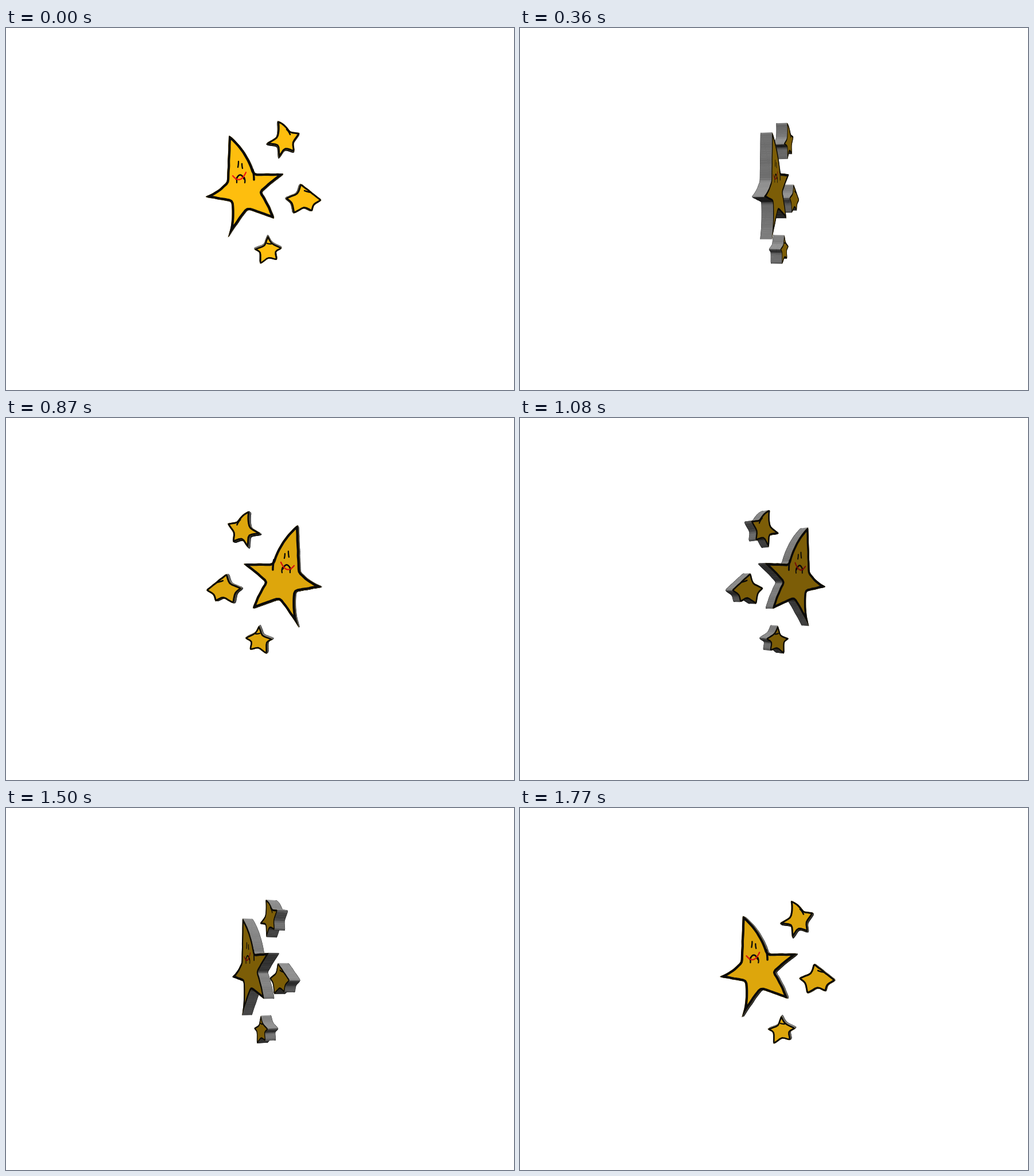
Write an HTML page with a canvas that moves like this. It is 885 by 632 pixels and loops after 1.8 s.

```html
<!DOCTYPE html>
<html lang="en">
<head>
<meta charset="utf-8">
<title>Turning stars</title>
<style>
  html, body { margin: 0; width: 100%; height: 100%; overflow: hidden; background: #fff; }
  canvas { display: block; }
</style>
</head>
<body>
<canvas id="stage" width="885" height="632"></canvas>
<script>
const ctx = document.getElementById('stage').getContext('2d');
const LOOP = 1800, STEP = 30;
const AXIS = 449, EYE_Y = 296, DIST = 1100, HALF = 10;
const INK = '#0a0a0a';

// Each star: tip, notch, tip, notch... clockwise from the top.
// A third value bows the following edge outward; tick is the pen's overshoot.
const stars = [
  {
    pen: 4.2,
    corners: [[388, 186, 6], [433, 254], [485, 254, -1], [445, 287, 2], [468, 334, -1],
      [421, 317, -1], [386, 367, -4], [392, 303], [346, 295, -3], [385, 268]],
    tick: [[430, 248], [432, 256], [432, 265]]
  },
  {
    pen: 3,
    corners: [[472, 161, 3], [495, 181], [513, 183], [501, 200], [503, 217],
      [487, 211], [475, 228], [473, 205], [452, 202], [471, 191, -2]],
    tick: [[489, 177], [493, 181], [495, 186]]
  },
  {
    pen: 3,
    corners: [[513, 271], [531, 285], [551, 301], [537, 309], [534, 321],
      [519, 314], [501, 325], [497, 306], [486, 297], [507, 288]],
    tick: [[520, 284], [525, 286], [531, 287]]
  },
  {
    pen: 2.7,
    corners: [[456, 361], [463, 375], [482, 384], [470, 391], [473, 406],
      [458, 402], [442, 413], [442, 392], [431, 386], [450, 379]],
    tick: [[455, 376], [458, 377], [462, 377]]
  }
];

const features = [
  { pen: 2.3, curve: [[405, 233], [405, 238], [404, 243]] },
  { pen: 2.3, curve: [[411, 237], [411, 241], [412, 245]] },
  { pen: 2.6, curve: [[401, 264], [408, 249], [415, 264]] },
  { pen: 2.3, curve: [[402, 262], [402, 266], [402, 270]] },
  { pen: 2.3, curve: [[415, 261], [417, 265], [416, 270]] },
  { pen: 2.3, red: true, curve: [[395, 258], [408, 274], [418, 252]] }
];

let seed = 7;
const random = () => (seed = seed * 16807 % 2147483647) / 2147483647;

function sample([a, b, c], parts) {
  return Array.from({ length: parts + 1 }, (_, i) => {
    const t = i / parts, u = 1 - t;
    return [0, 1].map(k => u * u * a[k] + 2 * u * t * b[k] + t * t * c[k]);
  });
}

const centre = ([x, y]) => [x - AXIS, y - EYE_Y];

function outline(corners) {
  const raw = corners.flatMap((a, i) => {
    const b = corners[(i + 1) % corners.length];
    const dx = b[0] - a[0], dy = b[1] - a[1], len = Math.hypot(dx, dy);
    const bow = 2 * (a[2] || 0) / len;
    const mid = [(a[0] + b[0]) / 2 + dy * bow, (a[1] + b[1]) / 2 - dx * bow];
    const parts = Math.max(4, Math.round(len / 4));
    const wobble = () => (random() - 0.5) * 0.8;
    return sample([a, mid, b], parts).slice(0, -1)
      .map(([x, y], k) => k ? [x + wobble(), y + wobble()] : [x, y]);
  });
  // Averaging with the neighbours blunts the corners.
  const n = raw.length;
  return raw.map((p, i) => centre([0, 1].map(k =>
    (raw[(i + n - 1) % n][k] + 2 * p[k] + raw[(i + 1) % n][k]) / 4)));
}

for (const s of stars) {
  s.pts = outline(s.corners);
  s.mid = s.pts.reduce((sum, p) => sum + p[0], 0) / s.pts.length;
  s.marks = [{ pen: s.pen * 0.85, curve: s.tick }];
}
stars[0].marks.push(...features);
for (const m of stars.flatMap(s => s.marks)) m.pts = sample(m.curve, 12).map(centre);

function project([x, y], z, cos, sin) {
  const depth = z * cos - x * sin;
  const f = (DIST - HALF) / (DIST - depth);
  return [AXIS + (x * cos + z * sin) * f, EYE_Y + y * f, depth];
}

function trace(pts, closed) {
  ctx.beginPath();
  for (const [x, y] of pts) ctx.lineTo(x, y);
  if (closed) ctx.closePath();
}

// Strokes the current path with a pen narrowed by the turn.
function ink(width, colour, squeeze) {
  ctx.save();
  ctx.transform(squeeze, 0, 0, 1, 0, 0);
  ctx.lineWidth = width;
  ctx.strokeStyle = colour;
  ctx.stroke();
  ctx.restore();
}

function drawSides(star, cos, sin) {
  const front = star.pts.map(p => project(p, HALF, cos, sin));
  const back = star.pts.map(p => project(p, -HALF, cos, sin));
  const quads = [];
  star.pts.forEach((p, i) => {
    const j = (i + 1) % star.pts.length, q = star.pts[j];
    const a = front[i], b = front[j], c = back[j], d = back[i];
    const area = (c[0] - a[0]) * (d[1] - b[1]) - (c[1] - a[1]) * (d[0] - b[0]);
    if (area >= 0) return;
    const len = Math.hypot(q[0] - p[0], q[1] - p[1]) || 1;
    const nx = (q[1] - p[1]) / len, up = (q[0] - p[0]) / len;
    const facing = Math.max(0, -nx * sin);
    const v = Math.round(255 * (0.31 + 0.24 * up + 0.12 * facing));
    quads.push({ pts: [a, b, c, d], depth: a[2] + b[2] + c[2] + d[2], colour: `rgb(${v},${v},${v})` });
  });
  quads.sort((m, n) => m.depth - n.depth);

  trace(cos > 0 ? back : front, true);
  ink(1.2, INK, 1);
  ctx.lineWidth = 0.7;
  for (const q of quads) {
    trace(q.pts, true);
    ctx.fillStyle = ctx.strokeStyle = q.colour;
    ctx.fill();
    ctx.stroke();
  }
}

function drawFace(star, cos, sin) {
  const squeeze = Math.abs(cos);
  if (squeeze * DIST <= HALF) return;
  const z = HALF * Math.sign(cos);
  const light = 0.49 + 0.51 * Math.pow(squeeze, 53);
  const shade = (...rgb) => `rgb(${rgb.map(v => Math.round(v * light))})`;
  const place = p => project(p, z, cos, sin);

  ctx.save();
  trace(star.pts.map(place), true);
  ctx.fillStyle = shade(254, 190, 14);
  ctx.fill();
  ctx.clip();
  ink(star.pen * 2, INK, squeeze);
  ctx.restore();
  for (const m of star.marks) {
    trace(m.pts.map(place), false);
    ink(m.pen, m.red ? shade(240, 24, 20) : INK, squeeze);
  }
}

function draw(time) {
  const turn = Math.floor((time % LOOP) / STEP) * STEP / LOOP * Math.PI * 2;
  const cos = Math.cos(turn), sin = Math.sin(turn);
  ctx.fillStyle = '#fff';
  ctx.fillRect(0, 0, 885, 632);
  ctx.lineJoin = ctx.lineCap = 'round';
  const farFirst = [...stars].sort((a, b) => (b.mid - a.mid) * sin);
  for (const s of farFirst) {
    drawSides(s, cos, sin);
    drawFace(s, cos, sin);
  }
}

const start = performance.now();
function tick() {
  draw(performance.now() - start);
  requestAnimationFrame(tick);
}
tick();
</script>
</body>
</html>
```
